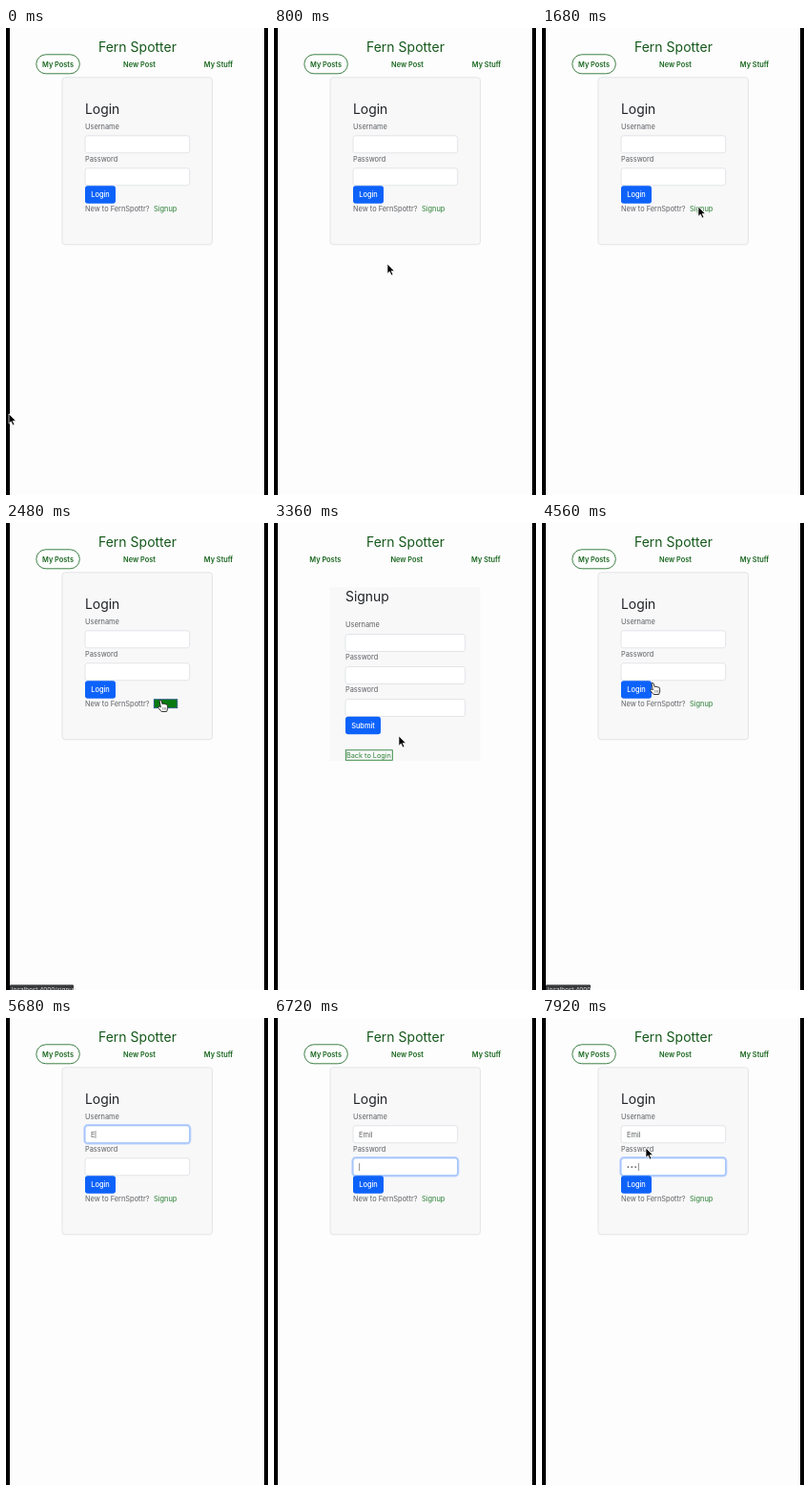
Recreate the animation shown at these times as an HTML page. Size 275 px wide and 489 px high, loop 8 s.

```html
<!DOCTYPE html>
<html lang="en">
<head>
<meta charset="utf-8">
<title>Login and signup</title>
<style>
html, body { margin: 0; width: 100%; height: 100%; overflow: hidden; background: #000; }
svg { display: block; width: 275px; height: 489px; font-family: Inter, Roboto, sans-serif; }
</style>
</head>
<body>
<svg id="stage" viewBox="0 0 275 489"></svg>
<script>
const LOOP = 8000, STEP = 80;
const GREEN = '#17651d', LINK = '#2d8136', GREY = '#5e6063', INK = '#202327';
const USER = 'Emil';
const stage = document.getElementById('stage');

// Pointer path: time, x, y
const path = [
  [0, 3, 404], [400, 60, 327], [480, 60, 327], [800, 119, 247], [880, 119, 247],
  [1680, 164, 187], [1920, 162, 185], [2640, 162, 185], [3360, 131, 223],
  [3920, 106, 240], [4400, 106, 240], [4560, 116, 167], [5040, 110, 120],
  [7680, 110, 120], [7920, 109, 136], [LOOP, 109, 138]
];

const shapes = {
  arrow: '<path d="M0 0V10.3L2.4 8.1 4.1 12 5.9 11.2 4.2 7.4H7.4Z" fill="#000" stroke="#fff" stroke-width=".7"/>',
  hand: '<path d="M-1 1Q0-.4 1 1L2 4.5Q3.2 3.5 4 4.6 5.2 3.9 5.8 5 7.3 4.7 7.5 6.2L7.8 9 6.6 12.5H1.2L-2.2 8.5Q-2.6 6.8-.5 7.2L.4 7.8Z" fill="#fff" stroke="#222" stroke-width=".9"/><path d="M2.7 8v2.6M4.3 8v2.6M5.8 8v2.6" stroke="#444" stroke-width=".5"/>',
  beam: '<path d="M-2-5Q0-5 0-3.5V3.5Q0 5-2 5M2-5Q0-5 0-3.5M0 3.5Q0 5 2 5" fill="none" stroke="#222" stroke-width=".8"/>'
};

const within = (t, a, b) => t >= a && t < b;

function text(x, y, str, size = 7.4, fill = GREY, weight = 400, anchor = 'start') {
  return `<text x="${x}" y="${y}" font-size="${size}" fill="${fill}" font-weight="${weight}" text-anchor="${anchor}">${str}</text>`;
}

function rect(x, y, w, h, fill, stroke = 'none', r = 0, sw = .8) {
  return `<rect x="${x}" y="${y}" width="${w}" height="${h}" rx="${r}" fill="${fill}" stroke="${stroke}" stroke-width="${sw}"/>`;
}

function field(x, y, w, focused) {
  const ring = focused ? rect(x - .3, y - .3, w + .6, 18.6, 'none', '#bdd3fd', 3, 2.8) : '';
  return ring + rect(x, y, w, 18, '#fff', focused ? '#86b0f8' : '#dcdfe3', 2.6);
}

function button(x, y, w, label) {
  return rect(x, y, w, 18.5, '#0d62fa', 'none', 2.8) + text(x + w / 2, y + 12, label, 7.4, '#fff', 500, 'middle');
}

function header(login) {
  const dx = login ? 0 : -.7;
  return text(138, 24.7, 'Fern Spotter', 14, '#14581a', 400, 'middle') +
    (login ? rect(31.8, 27.8, 45.5, 20, '#fff', '#3c8044', 10, 1) : '') +
    ['My Posts', 'New Post', 'My Stuff'].map((s, i) =>
      text([54.5, 140, 223][i] + dx, 40.6, s, 7.4, GREEN, 600, 'middle')).join('');
}

function caret(t, x, y) {
  return within(t % 1000, 400, 1000) ? rect(x, y, .6, 8, '#555') : '';
}

function loginPage(t) {
  const typed = USER.slice(0, [5680, 6000, 6160, 6320].filter(k => t >= k).length);
  const dots = [6960, 7120, 7280].filter(k => t >= k).length;
  const onUser = within(t, 5200, 6560), onPass = t >= 6560;
  const hover = within(t, 1920, 2640);
  let out = rect(59, 51.8, 157.5, 175, '#f8f8f9', '#dedfe1', 3) +
    text(83, 90, 'Login', 13.9, INK) +
    text(83, 105.6, 'Username') + field(83, 112.8, 109.7, onUser) +
    text(83, 139.7, 'Password') + field(83, 146.8, 109.7, onPass) +
    button(83, 165.3, 32, 'Login') +
    text(83, 192, 'New to FernSpottr?') +
    text(155, 192, 'Signup', 7.4, LINK) +
    text(89, 124.6, typed);
  for (let i = 0; i < dots; i++) out += `<circle cx="${90.4 + i * 3.9}" cy="156" r=".85" fill="#444"/>`;
  if (hover) out += rect(155.3, 184.7, 24.5, 9, '#087a12', t >= 2400 ? '#24508c' : '#087a12');
  if (onUser) out += caret(t, 89 + [0, 4.7, 11.2, 13, 15][typed.length], 118);
  if (onPass) out += caret(t, 89 + dots * 4, 152);
  return out;
}

function signupPage(t) {
  const hover = within(t, 3840, 4400);
  return rect(58.5, 67.5, 158, 181.5, '#f8f8f9') +
    text(75, 81.5, 'Signup', 13.9, INK) +
    ['Username', 'Password', 'Password'].map((s, i) =>
      text(75, 109.3 + i * 34, s) + field(75, 116.5 + i * 34, 125.7)).join('') +
    button(75, 202.8, 37, 'Submit') +
    rect(75.3, 237.8, 49, 10.5, hover ? '#087a12' : 'none', LINK, 0, .9) +
    text(76, 245.8, 'Back to Login', 7.3, hover ? '#087a12' : LINK);
}

function status(t) {
  const url = within(t, 1920, 2880) ? 'localhost:4000/signup' : within(t, 3840, 4720) ? 'localhost:4000' : '';
  return url && rect(4, 483.5, url.length > 15 ? 67 : 47, 8, '#38393b', 'none', 1) + text(6, 490.6, url, 6.4, '#ddd');
}

function pointer(t) {
  if (within(t, 5520, 7760)) return '';
  const i = path.findIndex(p => p[0] > t), [t0, x0, y0] = path[i - 1], [t1, x1, y1] = path[i];
  const k = (t - t0) / (t1 - t0);
  const shape = within(t, 1840, 2640) || within(t, 3760, 4640) ? 'hand' : within(t, 4960, 5520) ? 'beam' : 'arrow';
  return `<g transform="translate(${x0 + (x1 - x0) * k} ${y0 + (y1 - y0) * k})">${shapes[shape]}</g>`;
}

let last = -1;
function draw(now) {
  const t = Math.floor(now % LOOP / STEP) * STEP;
  if (t !== last) {
    const login = !within(t, 2560, 4400);
    stage.innerHTML = rect(4, 0, 267, 489, '#fdfdfd') + header(login) +
      (login ? loginPage(t) : signupPage(t)) + status(t) + pointer(t);
    last = t;
  }
  requestAnimationFrame(draw);
}
draw(0);
</script>
</body>
</html>
```
